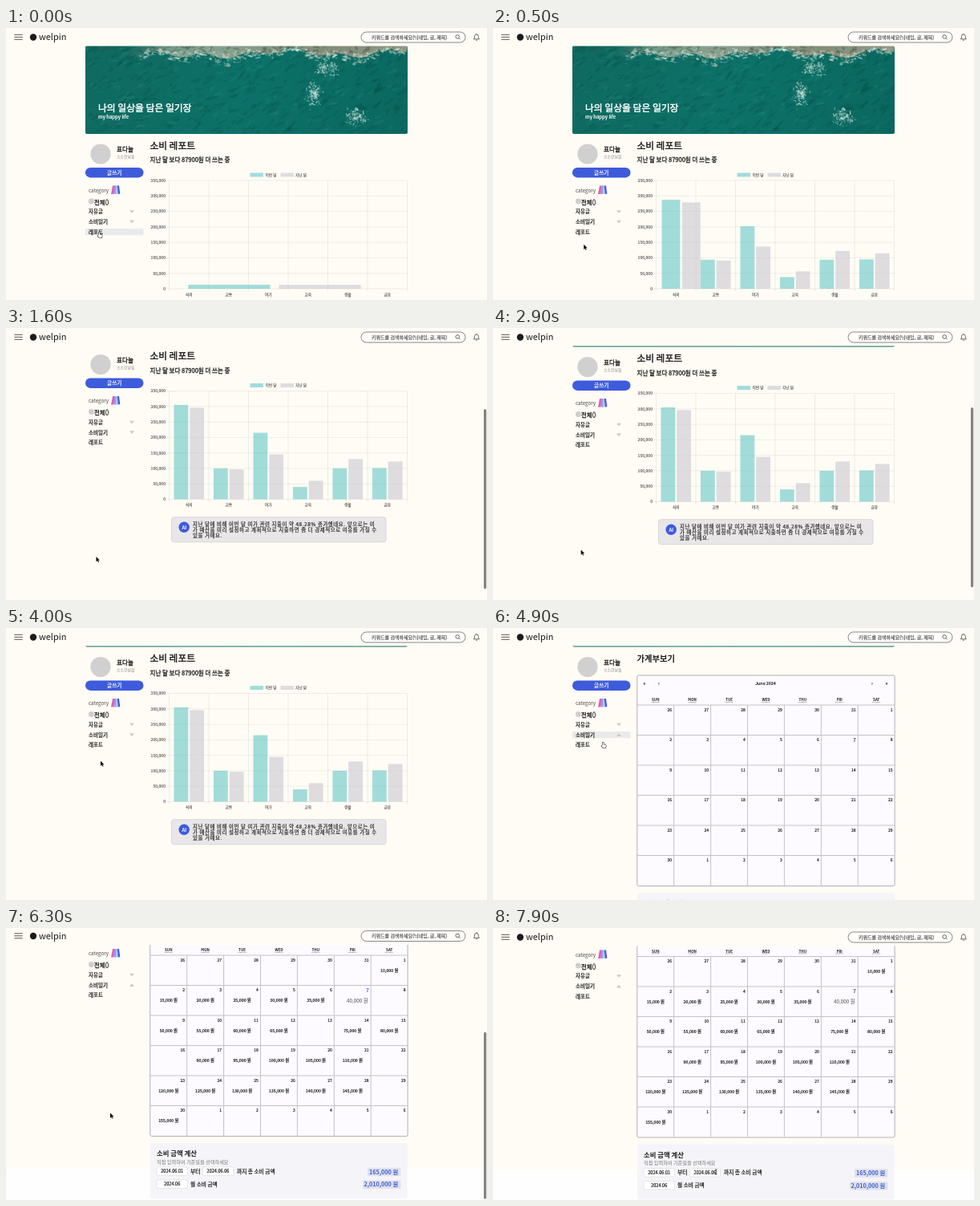
An HTML page with a canvas that plays this animation: 600 px wide and 339 px high, repeating every 8000 ms.

```html
<!DOCTYPE html>
<html lang="ko">
<head>
<meta charset="utf-8">
<title>소비 레포트</title>
<style>
html, body { margin: 0; width: 100%; height: 100%; overflow: hidden; background: #fffcf5; }
canvas { display: block; width: 600px; height: 339px; }
</style>
</head>
<body>
<canvas id="stage"></canvas>
<script>
const W = 600, H = 339, LOOP = 8000, STEP = 100;
const BG = '#fffcf5', BLUE = '#3d5bdb', INK = '#1c1c1c';
const TEAL = 'rgba(75,192,192,.52)', SILVER = 'rgba(200,200,208,.6)';
const SANS = '"Noto Sans CJK KR","Noto Sans CJK JP","Noto Sans",sans-serif';
const PAGE_SWAP = 4600, MONEY_IN = 5200, MAX_SCROLL = 169;

const canvas = document.getElementById('stage');
const dpr = window.devicePixelRatio || 1;
canvas.width = W * dpr;
canvas.height = H * dpr;
const ctx = canvas.getContext('2d');

// Keys are [time, value, value...], linear between neighbours.
const SCROLL = [[0, 0], [900, 0], [1000, 16], [1200, 62], [1400, 98], [1600, 111.5],
  [2100, 118], [2800, 108.5], [5700, 108.5], [5900, 128], [6100, 159], [6300, 170.5], [6500, 170.5], [6800, 169]];
const POINTER = [[0, 114, 254.5], [200, 114, 254.5], [800, 112.5, 285], [2800, 112.5, 285], [3500, 93, 225],
  [4300, 133, 130], [4800, 133, 130], [4900, 135, 142.5], [5600, 130, 230.5], [6350, 130, 230.5], [7500, 278.3, 304]];
const BAR = [[0, 0], [900, 0], [1000, 1], [3100, 1], [3500, 0], [5700, 0], [5800, 1], [6800, 1], [7200, 0]];

function at(keys, t) {
  let i = 0;
  while (i < keys.length - 1 && keys[i + 1][0] <= t) i++;
  const a = keys[i], b = keys[i + 1] || a;
  const u = b === a ? 0 : (t - a[0]) / (b[0] - a[0]);
  return a.slice(1).map((v, k) => v + (b[k + 1] - v) * u);
}

// Weight 500 is regular type thickened by a hairline outline.
function text(str, x, y, size, { weight = 400, color = INK, align = 'left', gap = 0 } = {}) {
  const medium = weight === 500;
  ctx.font = `${medium ? 400 : weight} ${size}px ${SANS}`;
  ctx.letterSpacing = gap + 'px';
  ctx.textAlign = align;
  ctx.fillStyle = color;
  ctx.fillText(str, x, y + size * 0.37);
  if (medium) {
    ctx.strokeStyle = color;
    ctx.lineWidth = size * 0.036;
    ctx.lineJoin = 'round';
    ctx.strokeText(str, x, y + size * 0.37);
  }
}

function box(x, y, w, h, r, fill, stroke, line = 0.7) {
  ctx.beginPath();
  ctx.roundRect(x, y, w, h, r);
  if (fill) { ctx.fillStyle = fill; ctx.fill(); }
  if (stroke) { ctx.strokeStyle = stroke; ctx.lineWidth = line; ctx.stroke(); }
}

function disc(x, y, r, fill) {
  ctx.beginPath();
  ctx.arc(x, y, r, 0, Math.PI * 2);
  ctx.fillStyle = fill;
  ctx.fill();
}

function poly(points, fill) {
  ctx.beginPath();
  points.forEach(([x, y]) => ctx.lineTo(x, y));
  ctx.closePath();
  ctx.fillStyle = fill;
  ctx.fill();
}

function lines(segments, color, width) {
  ctx.beginPath();
  for (const [x1, y1, x2, y2] of segments) { ctx.moveTo(x1, y1); ctx.lineTo(x2, y2); }
  ctx.strokeStyle = color;
  ctx.lineWidth = width;
  ctx.stroke();
}

function makeSea() {
  const w = 402, h = 110;
  const sea = document.createElement('canvas');
  sea.width = w * dpr;
  sea.height = h * dpr;
  const c = sea.getContext('2d');
  c.scale(dpr, dpr);
  let seed = 11;
  const rnd = () => (seed = (seed * 16807) % 2147483647) / 2147483647;
  const bell = () => rnd() + rnd() + rnd() - 1.5;
  const blob = (x, y, rx, ry, turn, fill) => {
    c.fillStyle = fill;
    c.beginPath();
    c.ellipse(x, y, rx, ry, turn, 0, 7);
    c.fill();
  };

  const base = c.createLinearGradient(0, 0, w, h);
  base.addColorStop(0, '#0f6a60');
  base.addColorStop(0.5, '#0c7168');
  base.addColorStop(1, '#0a685f');
  c.fillStyle = base;
  c.fillRect(0, 0, w, h);

  for (let i = 0; i < 700; i++) {
    const x = rnd() * w, y = rnd() * h;
    const tone = i % 3 ? '0,58,54' : '60,150,135';
    blob(x, y, 2 + rnd() * 6, 0.6 + rnd() * 1.6, -0.5 + bell() * 0.5, `rgba(${tone},${0.06 + rnd() * 0.13})`);
  }

  // Shoreline along the top, pale sand first and rock to the right.
  const edge = x => 11 + 4 * Math.sin(x / 23) + 3 * Math.sin(x / 9 + 1) + 6 * Math.exp(-(((x - 115) / 35) ** 2));
  const sand = c.createLinearGradient(50, 0, w, 0);
  sand.addColorStop(0, 'rgba(90,130,112,0)');
  sand.addColorStop(0.15, 'rgba(150,170,150,.75)');
  sand.addColorStop(0.35, 'rgba(165,172,152,.8)');
  sand.addColorStop(0.7, 'rgba(150,145,122,.85)');
  sand.addColorStop(1, 'rgba(165,160,140,.85)');
  c.fillStyle = sand;
  c.beginPath();
  c.moveTo(50, 0);
  for (let x = 50; x <= w; x += 3) c.lineTo(x, edge(x) - 2);
  c.lineTo(w, 0);
  c.fill();
  for (let i = 0; i < 420; i++) {
    const x = 65 + rnd() * (w - 65);
    blob(x, edge(x) * (0.9 + bell() * 0.5), 0.7 + rnd() * 3, 0.4 + rnd() * 1.1, bell(), `rgba(226,232,218,${0.15 + rnd() * 0.4})`);
  }
  for (let i = 0; i < 90; i++) {
    blob(rnd() * w, rnd() * 9, 1 + rnd() * 4, 0.5 + rnd() * 1.5, bell(), 'rgba(50,72,60,.3)');
  }

  const foam = [[301, 29, 13, 8, 120], [285, 60, 9, 15, 130], [338, 89, 12, 11, 130]];
  for (const [x, y, sx, sy, n] of foam) {
    for (let i = 0; i < n; i++) {
      blob(x + bell() * sx, y + bell() * sy, 0.5 + rnd() * 1.8, 0.3 + rnd() * 0.8, rnd() * 3, `rgba(215,235,228,${0.12 + rnd() * 0.45})`);
    }
  }
  return sea;
}
const sea = makeSea();

function drawBanner() {
  ctx.save();
  ctx.beginPath();
  ctx.roundRect(99, 22, 402, 110, 2);
  ctx.clip();
  ctx.drawImage(sea, 99, 22, 402, 110);
  ctx.restore();
  text('나의 일상을 담은 일기장', 115, 100, 11.8, { weight: 500, color: '#fff' });
  text('my happy life', 115, 111, 6.1, { weight: 500, color: '#fff' });
}

function triangle(x, y, up) {
  const d = up ? -1.8 : 1.8;
  poly([[x - 3, y - d], [x + 3, y - d], [x, y + d]], '#cbc9c6');
}

function drawSidebar(t) {
  const medium = { weight: 500 };
  disc(118, 157, 12.6, '#d1d0d1');
  text('표다늘', 138, 151.5, 7.6, medium);
  text('소소한날들', 138, 160.2, 4.9, { color: '#888' });
  box(99, 174, 72.5, 12.4, 6.2, BLUE);
  text('글쓰기', 135.2, 180.2, 6.6, { weight: 500, color: '#fff', align: 'center' });

  text('category', 103, 202.5, 6.2, { color: '#444' });
  [['#e65fb0', 131], ['#8f9cf0', 134.6], ['#b9c4fa', 136.8]].forEach(([fill, x], i) => {
    const lean = i ? 0.6 : 2;
    poly([[x + lean, 196.5], [x + lean + 3.2, 196.5], [x + 3.4, 207], [x, 207]], fill);
  });
  poly([[138.8, 196.5], [141, 196.5], [142.3, 206.6], [140, 207]], BLUE);

  disc(106.4, 216, 3.4, '#cfcdcd');
  text('전체()', 110, 217, 7.4, medium);
  const hover = t < 300 ? 250 : t >= 4200 && t < 5100 ? 237.5 : 0;
  if (hover) box(99, hover, 72.5, 8.2, 1, '#ebeaea');
  text('자유글', 103, 229, 6.5, medium);
  text('소비일기', 103, 241.6, 6.5, medium);
  text('레포트', 103, 254.2, 6.5, medium);
  triangle(157, 229, false);
  triangle(157, 241.6, t >= PAGE_SWAP);
}

const NOW = [305, 100, 215, 40, 100, 101], BEFORE = [296, 97, 145, 60, 130, 122];
const KINDS = ['식비', '교통', '여가', '교육', '생활', '금융'];

function drawChart(t) {
  const left = 203.5, right = 500.5, top = 190, base = 325;
  const col = (right - left) / 6, row = (base - top) / 7;
  const small = { color: '#666', weight: 500 };
  box(304.5, 180.5, 16.5, 5, 0, TEAL);
  text('이번 달', 323.5, 183, 4.7, small);
  box(342.5, 180.5, 16.5, 5, 0, SILVER);
  text('지난 달', 361, 183, 4.7, small);

  const grid = [];
  for (let i = 0; i <= 7; i++) {
    const y = top + i * row;
    grid.push([left - 3, y, right, y]);
    const n = (7 - i) * 50;
    text(n ? n + ',000' : '0', 199, y, 5.1, { ...small, align: 'right' });
  }
  for (let i = 0; i <= 6; i++) grid.push([left + i * col, top, left + i * col, base + 3]);
  lines(grid, 'rgba(0,0,0,.11)', 0.6);

  const p = 1 - Math.pow(1 - Math.min(1, (t + 11) / 1000), 4);
  const wide = col * 0.36;
  KINDS.forEach((kind, i) => {
    const mid = left + (i + 0.5) * col;
    text(kind, mid, 332, 4.7, { ...small, align: 'center' });
    [[NOW, -1, 281.2, TEAL], [BEFORE, 1, 398.5, SILVER]].forEach(([data, side, from, fill]) => {
      const goal = mid + side * col * 0.2;
      const x = i ? goal : from + (goal - from) * p;
      const w = i ? wide : 106 + (wide - 106) * p;
      const grow = i ? Math.max(0, (p - 0.05) / 0.95) : p;
      const h = data[i] / 350 * (base - top) * grow;
      ctx.fillStyle = fill;
      ctx.fillRect(x - w / 2, base - h, w, h);
    });
  });
}

function drawReport(t) {
  text('소비 레포트', 179.5, 146.5, 11.7, { weight: 500 });
  text('지난 달 보다 87900원 더 쓰는 중', 179.5, 164.5, 7.5, { weight: 500 });
  drawChart(t);
  box(206.5, 347.2, 267.5, 31, 3, '#e9e6e8', '#d2d0d5', 0.8);
  disc(222.2, 359.7, 6.7, BLUE);
  text('AI', 222.2, 359.8, 6.2, { weight: 500, color: '#fff', align: 'center' });
  ['지난 달에 비해 이번 달 여가 관련 지출이 약 48.28% 증가했네요. 앞으로는 여',
    '가 예산을 미리 설정하고 계획적으로 지출하면 좀 더 경제적으로 여유를 가질 수',
    '있을 거예요.'].forEach((s, i) => text(s, 233, 356.5 + i * 6.8, 6.4, { gap: 0.6, weight: 500, color: '#333' }));
}

const SKIPPED = [8, 13, 16, 22, 29];

function drawCalendar(t) {
  const left = 179.8, top = 204.5, cw = 45.9, ch = 37.5;
  box(left, 167.5, cw * 7, 262.5, 2, '#fdfbff', '#a09fa0', 0.8);
  const mid = { align: 'center', weight: 500 };
  [['«', 189], ['‹', 207], ['›', 473], ['»', 491]].forEach(([s, x]) => text(s, x, 177.3, 6, mid));
  text('June 2024', 340, 177.5, 5.4, mid);

  const grid = [];
  for (let r = 0; r < 6; r++) grid.push([left, top + r * ch, left + cw * 7, top + r * ch]);
  for (let k = 1; k < 7; k++) grid.push([left + k * cw, top, left + k * cw, top + ch * 6]);
  lines(grid, '#c4c2c5', 1);

  'SUN MON TUE WED THU FRI SAT'.split(' ').forEach((name, k) => {
    const x = left + (k + 0.5) * cw;
    text(name, x, 198.3, 4.5, { weight: 700, align: 'center' });
    ctx.setLineDash([0.8, 0.4]);
    lines([[x - 5, 201, x + 5, 201]], '#333', 0.5);
    ctx.setLineDash([]);
  });

  for (let i = 0; i < 42; i++) {
    const x = left + (i % 7) * cw, y = top + Math.floor(i / 7) * ch;
    const d = i - 5, june = d >= 1 && d <= 30, today = d === 7;
    const label = d < 1 ? d + 31 : d > 30 ? d - 30 : d;
    const color = today ? (t >= MONEY_IN && t < 7000 ? BLUE : '#444') : INK;
    text(label, x + cw - 2.6, y + 6, today ? 6.1 : 5, { align: 'right', weight: 500, color });
    if (june && t >= MONEY_IN && !SKIPPED.includes(d)) {
      text((d + 1) * 5 + ',000 원', x + cw / 2 + (today ? 6 : 0), y + 18.8, today ? 6.3 : 5.3,
        { align: 'center', weight: today ? 400 : 500, color: today ? '#444' : INK });
    }
  }
}

function field(str, x, y) {
  box(x, y, 38.3, 10.6, 1.5, '#fff', '#d8d7dc', 0.6);
  text(str, x + 19.2, y + 5.4, 5.6, { align: 'center', weight: 500 });
}

function total(str, x, y) {
  box(x, y, 492.5 - x, 10.4, 1.5, '#e0e1ea');
  text(str, 489, y + 5.3, 7.2, { weight: 700, color: BLUE, align: 'right' });
}

function drawLedger(t) {
  text('가계부보기', 179.5, 146.3, 10.3, { weight: 700 });
  drawCalendar(t);
  box(179.8, 438.8, 321, 68.7, 3, '#f5f4f8');
  text('소비 금액 계산', 188, 451.7, 8.4, { weight: 700 });
  text('직접 입력하여 기준일을 선택하세요', 188, 462.2, 6.2, { color: '#777' });
  field('2024.06.01', 188, 468.5);
  text('부터', 230, 473.7, 6.8, { weight: 500 });
  field('2024.06.06', 245.3, 468.5);
  text('까지 총 소비 금액', 288, 473.7, 6.7, { weight: 500 });
  field('2024.06', 188, 484.4);
  text('월 소비 금액', 230, 489.6, 6.7, { weight: 500 });
  if (t >= MONEY_IN) {
    total('165,000 원', 451, 469.3);
    total('2,010,000 원', 445, 485);
  }
}

const BELL = new Path2D('M583.4 13.8L584.5 12.2V10.4Q584.5 7.8 586.9 7.8T589.3 10.4V12.2L590.4 13.8ZM585.9 15.2H587.9M586.9 7.8V7');

function drawHeader() {
  ctx.fillStyle = BG;
  ctx.fillRect(0, -5, W, 27.5);
  lines([8.3, 11.3, 14.3].map(y => [10.3, y, 20.7, y]), '#444', 0.9);
  disc(34, 11.5, 4.2, INK);
  text('welpin', 41, 11.2, 11);
  box(443, 5, 130, 13, 6.5, '#fffefb', '#555', 0.7);
  text('키워드를 검색하세요(닉네임, 글, 제목)', 456, 11.4, 6, { weight: 500, color: '#555' });
  ctx.beginPath();
  ctx.arc(563.2, 10.9, 2.3, 0, 7);
  ctx.moveTo(564.9, 12.6);
  ctx.lineTo(566.7, 14.4);
  ctx.strokeStyle = '#444';
  ctx.lineWidth = 0.8;
  ctx.stroke();
  ctx.stroke(BELL);
}

const ARROW = new Path2D('M0 0V6.2L1.5 4.9 2.5 7.1 3.5 6.7 2.5 4.5H4.4Z');
const HAND = new Path2D('M1.6 3.6V.8Q1.6 0 2.3 0T3 .8V2.8L5.2 3.3Q6 3.6 5.9 4.4L5.4 7H2.4L.4 4.6Q.2 3.8 .9 3.8Z');
const BEAM = new Path2D('M-1.2 -3.2Q0 -3.2 0 -2.4Q0 -3.2 1.2 -3.2M0 -2.4V2.4M-1.2 3.2Q0 3.2 0 2.4Q0 3.2 1.2 3.2');

function drawPointer(t) {
  const [x, y] = at(POINTER, t);
  ctx.save();
  ctx.translate(x, y);
  if (t >= 7400) {
    ctx.strokeStyle = '#222';
    ctx.lineWidth = 0.8;
    ctx.stroke(BEAM);
  } else {
    const hand = t < 300 || (t >= 4200 && t < 5200);
    const shape = hand ? HAND : ARROW;
    ctx.strokeStyle = hand ? '#222' : '#fff';
    ctx.lineWidth = hand ? 1.2 : 1;
    ctx.fillStyle = hand ? '#fff' : '#000';
    ctx.stroke(shape);
    ctx.fill(shape);
  }
  ctx.restore();
}

function drawScrollbar(t, scroll) {
  const [alpha] = at(BAR, t);
  if (!alpha) return;
  const ledger = t >= PAGE_SWAP;
  ctx.globalAlpha = alpha;
  box(596, 27.5 + scroll * (ledger ? 0.6 : 0.66), 3.2, ledger ? 208 : 224, 1.6, '#858380');
  ctx.globalAlpha = 1;
}

function draw(t) {
  const [scroll] = at(SCROLL, t);
  ctx.setTransform(dpr, 0, 0, dpr, 0, 0);
  ctx.fillStyle = BG;
  ctx.fillRect(0, 0, W, H);

  ctx.save();
  ctx.translate(0, -scroll);
  ctx.fillStyle = '#fffefe';
  ctx.fillRect(0, 470, W, 200);
  drawBanner();
  drawSidebar(t);
  if (t < PAGE_SWAP) drawReport(t); else drawLedger(t);
  ctx.restore();

  // Overscroll drags the header along.
  ctx.save();
  ctx.translate(0, -Math.max(0, scroll - MAX_SCROLL));
  drawHeader();
  ctx.restore();
  drawScrollbar(t, scroll);
  drawPointer(t);
}

const start = performance.now();
function tick() {
  const t = (performance.now() - start) % LOOP;
  draw(Math.floor(t / STEP) * STEP);
  requestAnimationFrame(tick);
}
tick();
</script>
</body>
</html>
```
